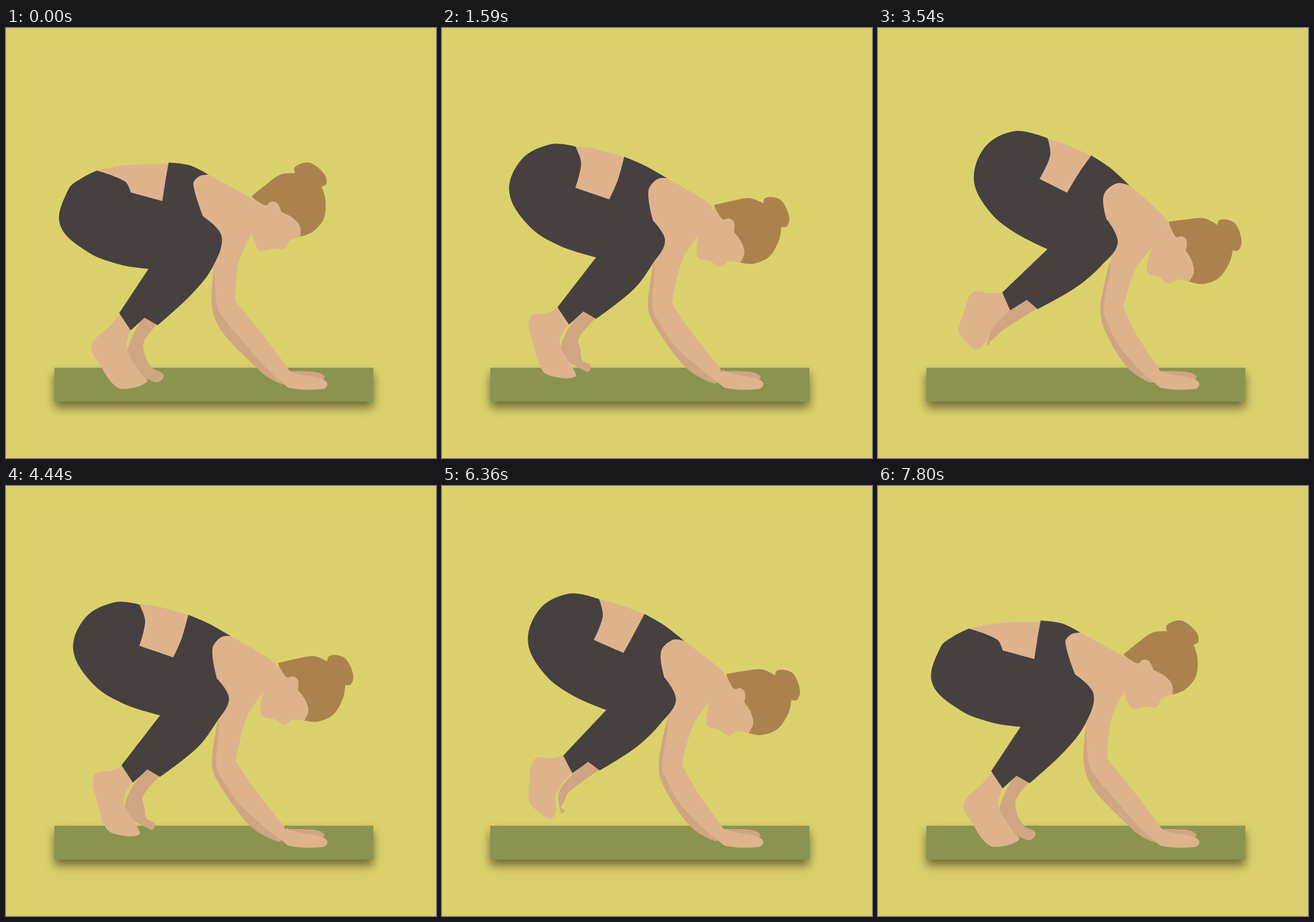
These frames come from a looping animation (748 px wide and 748 px high, 8.55 s). An HTML page with a canvas:

```html
<!DOCTYPE html>
<html lang="en">
<head>
<meta charset="utf-8">
<title>Crow pose</title>
<style>
html, body { margin: 0; width: 100%; height: 100%; overflow: hidden; background: #dbd16c; }
canvas { display: block; }
</style>
</head>
<body>
<canvas id="stage" width="748" height="748"></canvas>
<script>
const ctx = document.getElementById('stage').getContext('2d');
const SKIN = '#deb38c', SHADE = '#d0a582', CLOTH = '#474040', HAIR = '#ab824d';
const CYCLE = 2850, TICK = 30, STEP = 37.5;
const LEAN_STEPS = 8, LIFT_STEPS = 20, PEAK = LEAN_STEPS + LIFT_STEPS;

const ease = t => t < 0.5 ? 4 * t ** 3 : 1 - 4 * (1 - t) ** 3;

// Lift progress at which the drawn poses sit
const LEAN = ease(0.3), MID = 0.5, HIGH = ease(0.85);

// Outlines are flat x, y lists; corners are the indices of sharp points
const farLeg = {
  color: SHADE, corners: [0, 7], bend: { x: -20, y: 11, from: 1, to: 5 },
  crouch: [264,514, 240,546, 242,570, 254,591, 274,604, 260,616, 210,580, 240,500],
  lean: [268,504, 238,540, 241,560, 244,578, 259,588, 252,598, 207,560, 245,490],
  high: [290,467, 232,486, 203,487, 175,483, 159,477, 156,467, 200,455, 275,445]
};

const farArm = {
  color: SHADE, corners: [0, 6],
  crouch: [362,415, 358,482, 374,526, 436,591, 461,611, 484,617, 420,520],
  lean: [369,405, 358,480, 366,510, 414,580, 447,607, 478,615, 405,510],
  high: [447,405, 423,485, 426,537, 441,582, 459,604, 481,613, 450,510]
};

const farHand = {
  color: SHADE, corners: [0, 5],
  lean: [488,597, 520,597, 545,600, 554,608, 545,612, 485,617]
};

const nearFoot = {
  color: SKIN, corners: [0, 9], bend: { x: -11, y: 14, from: 6, to: 8 },
  crouch: [199,497, 182,517, 149,553, 165,588, 185,618, 203,628, 245,616, 236,603, 210,556, 219,520],
  lean: [203,486, 185,495, 153,504, 159,550, 174,595, 192,606, 231,607, 228,592, 205,547, 224,510],
  high: [237,427, 212,420, 180,405, 135,432, 98,442, 97,462, 118,468, 156,466, 215,463, 245,456]
};

const midriff = {
  color: SKIN, corners: [0, 2, 3, 4],
  crouch: [158,248, 205,239, 284,236, 275,305, 205,290],
  lean: [230,206, 262,209, 318,225, 295,302, 225,282],
  high: [371,174, 405,194, 440,220, 378,276, 335,246]
};

const nearArm = {
  color: SKIN, corners: [0, 4, 6, 8, 9, 15, 16],
  crouch: [345,251, 385,273, 420,292, 428,298, 428,357, 405,408, 399,475, 448,535, 494,597,
    493,626, 458,597, 412,545, 376,502, 366,480, 360,415, 315,300, 315,255],
  lean: [385,258, 428,282, 460,302, 470,314, 447,359, 418,404, 400,479, 429,522, 484,592,
    493,626, 454,597, 403,550, 377,511, 366,488, 369,402, 345,305, 345,258],
  high: [488,280, 524,328, 544,360, 547,374, 512,411, 482,446, 460,494, 475,546, 496,595,
    493,626, 467,602, 444,563, 428,520, 425,492, 449,395, 420,310, 430,268]
};

const nearHand = {
  color: SKIN, corners: [0, 6],
  lean: [488,595, 503,601, 548,610, 559,619, 551,628, 493,626, 478,612]
};

const leggings = {
  color: CLOTH, corners: [0, 2, 3, 4, 8, 9, 10, 11, 12],
  crouch: [158,248, 207,267, 217,286, 272,301, 343,328, 375,362, 360,415, 323,463, 264,517,
    241,504, 217,526, 197,496, 248,419, 200,412, 143,390, 94,342, 109,280, 132,261],
  lean: [232,206, 242,235, 232,278, 291,298, 367,335, 388,370, 366,411, 333,455, 268,506,
    246,493, 221,516, 201,486, 268,399, 205,379, 152,345, 117,285, 139,228, 190,202],
  high: [373,174, 371,205, 342,243, 376,272, 435,328, 453,378, 416,417, 355,449, 290,468,
    275,448, 241,460, 235,428, 328,367, 285,331, 251,293, 229,242, 246,179, 300,151]
};

const top_ = {
  color: CLOTH, corners: [0, 2, 4, 7, 8],
  crouch: [272,301, 277,268, 283,234, 320,239, 352,255, 336,258, 326,272, 343,328, 300,335],
  lean: [291,298, 306,264, 317,224, 352,239, 391,261, 374,263, 359,284, 367,335, 320,340],
  high: [376,272, 402,240, 438,219, 469,249, 495,290, 466,279, 434,300, 435,328, 390,320]
};

const face = {
  color: SKIN, corners: [0, 1, 7, 8, 9, 10], head: true,
  lean: [455,335, 447,359, 443,382, 446,400, 467,406, 484,415, 500,406, 520,409, 540,370, 510,315, 474,311]
};

const hair = {
  color: HAIR, corners: [0, 3, 9, 13, 16], head: true,
  lean: [473,308, 503,301, 535,296, 559,305, 562,296, 580,295, 593,303, 604,329, 600,345, 590,346, 587,367,
    570,397, 542,410, 519,408, 526,391, 520,371, 508,355, 508,338, 499,331, 489,333, 480,322]
};

const parts = [farLeg, farArm, farHand, nearFoot, midriff, nearArm, nearHand, leggings, top_, face, hair];

// The head turns as one piece around the nape
const NAPE = { x: 473, y: 308 };
const HEAD_CROUCH = { x: 427, y: 293, xx: 0.899, xy: 0.438, yx: -0.438, yy: 0.899 };
const HEAD_HIGH = { x: 546, y: 373, xx: 0.965, xy: -0.222, yx: 0.222, yy: 0.99 };

function turned(list, m) {
  const out = [];
  for (let i = 0; i < list.length; i += 2) {
    const dx = list[i] - NAPE.x, dy = list[i + 1] - NAPE.y;
    out.push(m.x + m.xx * dx + m.xy * dy, m.y + m.yx * dx + m.yy * dy);
  }
  return out;
}

for (const p of parts) {
  p.crouch ??= p.head ? turned(p.lean, HEAD_CROUCH) : p.lean;
  p.high ??= p.head ? turned(p.lean, HEAD_HIGH) : p.lean;
}

// Coordinate i of a part at lift progress e; feet swing along a bent path
function lifted({ lean, high, bend }, i, e) {
  const v = lean[i] + (high[i] - lean[i]) * (e - LEAN) / (HIGH - LEAN);
  const point = i >> 1;
  if (!bend || point < bend.from || point > bend.to) return v;
  const swing = (e - LEAN) * (HIGH - e) / ((MID - LEAN) * (HIGH - MID));
  return v + swing * (i % 2 ? bend.y : bend.x);
}

function outline(p, step) {
  if (step > LEAN_STEPS) {
    const e = ease((step - LEAN_STEPS) / LIFT_STEPS);
    return p.crouch.map((_, i) => lifted(p, i, e));
  }
  const s = ease(step / LEAN_STEPS);
  return p.crouch.map((v, i) => v + (lifted(p, i, 0) - v) * s);
}

function fillSmooth(flat, corners, color) {
  const n = flat.length / 2;
  const at = i => { const j = (i + n) % n; return [flat[2 * j], flat[2 * j + 1]]; };
  const dist = (a, b) => Math.hypot(b[0] - a[0], b[1] - a[1]);
  // Control point beside point i, towards its next (+1) or previous (-1) neighbour
  const handle = (i, side) => {
    const p = at(i);
    if (corners.includes(i % n)) return p;
    const a = at(i - 1), b = at(i + 1);
    const k = side * dist(p, at(i + side)) / 3 / (dist(a, b) || 1);
    return [p[0] + (b[0] - a[0]) * k, p[1] + (b[1] - a[1]) * k];
  };
  ctx.beginPath();
  ctx.moveTo(...at(0));
  for (let i = 0; i < n; i++) {
    ctx.bezierCurveTo(...handle(i, 1), ...handle(i + 1, -1), ...at(i + 1));
  }
  ctx.fillStyle = color;
  ctx.fill();
}

function drawMat() {
  ctx.save();
  ctx.shadowColor = 'rgba(0, 0, 0, 0.5)';
  ctx.shadowBlur = 16;
  ctx.shadowOffsetY = 10;
  ctx.fillStyle = '#8a9350';
  ctx.fillRect(84, 591, 555, 59);
  ctx.restore();
}

function draw(now) {
  const t = Math.floor(now % CYCLE / TICK) * TICK;
  const count = Math.min(2 * PEAK, Math.floor(t / STEP));
  const step = PEAK - Math.abs(PEAK - count);
  ctx.fillStyle = '#dbd16c';
  ctx.fillRect(0, 0, 748, 748);
  drawMat();
  for (const p of parts) fillSmooth(outline(p, step), p.corners, p.color);
}

const start = performance.now();
function loop() {
  draw(performance.now() - start);
  requestAnimationFrame(loop);
}
loop();
</script>
</body>
</html>
```
